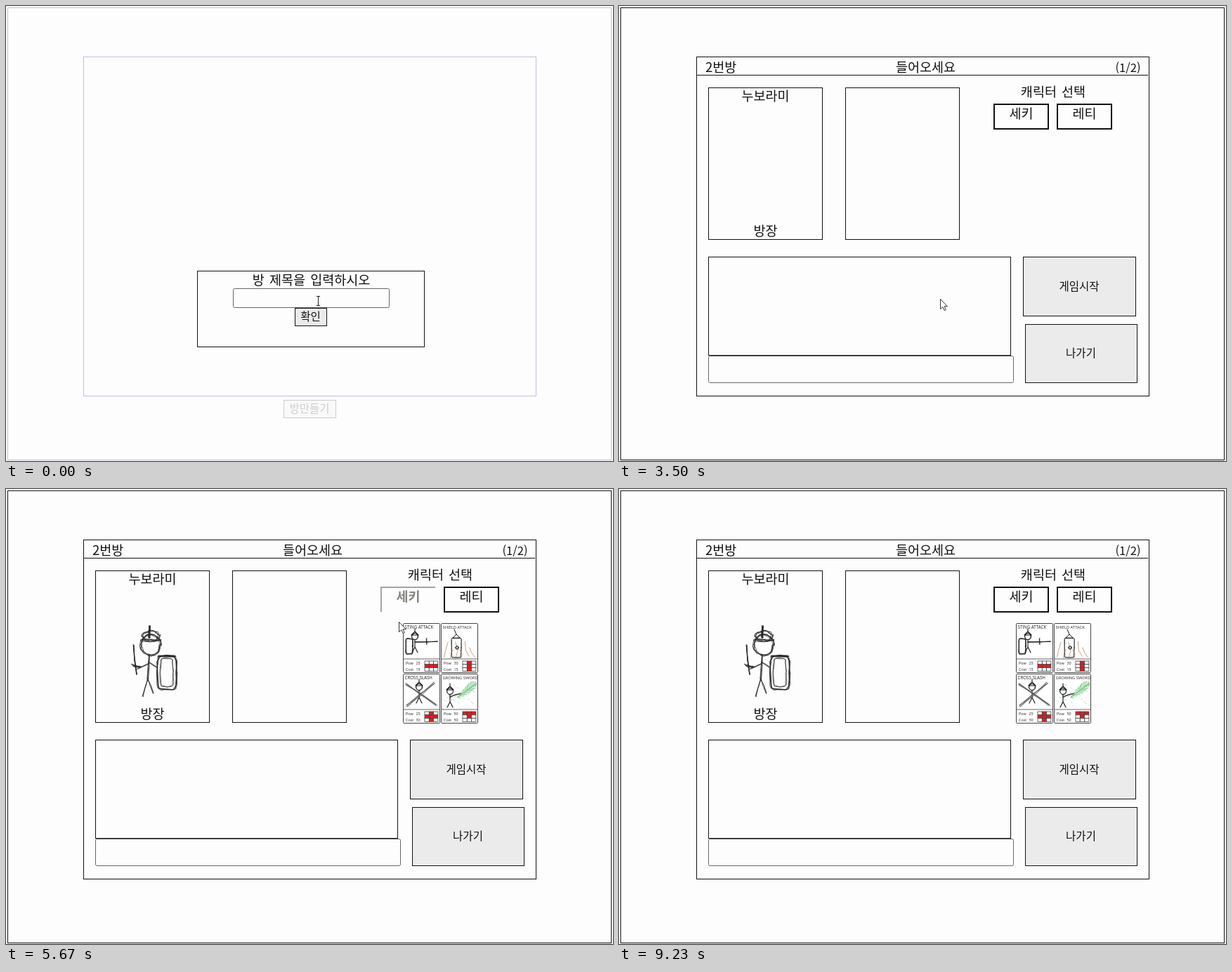
An HTML page that plays this animation: 864 by 648 pixels, repeating every 9.31 s.

```html
<!DOCTYPE html>
<html lang="ko">
<head>
<meta charset="utf-8">
<title>방 만들기</title>
<style>
  html, body { margin: 0; width: 100%; height: 100%; overflow: hidden; background: #fdfdfd; }
  svg { display: block; width: 864px; height: 648px; }
  text { font-family: "Noto Sans CJK KR", "Noto Sans CJK", sans-serif; fill: #111; white-space: pre; }
  .card text { font-family: "Open Sans", sans-serif; fill: #222; }
  .line { fill: none; stroke: #111; }
  .sketch { fill: none; stroke-linecap: round; stroke-linejoin: round; }
  #lobby > .line.faded { stroke: #c4c0d8; }
  .button .line { fill: #ebebec; }
  .field .line { fill: #fdfdfd; stroke: #666; }
  .field .focus { stroke: #111; stroke-width: 2; }
</style>
</head>
<body>
<svg viewBox="0 0 864 648">
  <g id="lobby"></g>
  <g id="room"></g>
  <path id="arrow" d="M.5 .5v14.2l3.3-3.1 2.4 5 2.1-1-2.3-4.8h4.4z" fill="#fff" stroke="#333"/>
  <path id="beam" d="M-2 -6.5h5M.5 -6v12M-2 6.5h5" fill="none" stroke="#222"/>
</svg>
<script>
const LOOP = 9310, BIG = 18.5, SMALL = 15.5;
const $ = id => document.getElementById(id);

let seed = 7;
const rand = () => (seed = seed * 16807 % 2147483647) / 2147483647;
const jitter = amount => (rand() - .5) * 2 * amount;
const times = (n, make) => Array.from({ length: n }, (_, i) => make(i));

// Boxes are given by the pixels of their outer lines
const box = (x, y, w, h, attrs = 'class="line"') =>
  `<rect x="${x + .5}" y="${y + .5}" width="${w}" height="${h}" ${attrs}/>`;
const label = (x, cy, size, str, attrs = 'text-anchor="middle"') =>
  `<text x="${x}" y="${cy + size * .37}" font-size="${size}" word-spacing="2" ${attrs}>${str}</text>`;
const button = (x, y, w, h, str, attrs = '') =>
  `<g class="button" ${attrs}>${box(x, y, w, h)}${label(x + w / 2, y + h / 2, SMALL, str)}</g>`;
const field = (id, x, y, w, h) => `<g class="field">
  ${box(x, y, w, h, `class="line" id="${id}Box" rx="2"`)}
  <rect class="line focus" id="${id}Focus" x="${x + 1}" y="${y}" width="${w - 1}" height="${h - .5}" rx="2"/></g>`;
const caret = (id, y) => `<rect id="${id}" y="${y}" width="1" height="16" fill="#111"/>`;

const stroke = (d, color = '#222', width = .7) =>
  `<path class="sketch" d="${d}" stroke="${color}" stroke-width="${width}"/>`;

// Retraces a curve p(0..1) several times with a loose hand
const trace = (p, steps, passes, loose, color) => stroke(times(passes, () =>
  'M' + times(steps + 1, i => p(i / steps).map(v => (v + jitter(loose)).toFixed(1)).join(' ')).join('L')).join(''), color);
const limb = (x1, y1, x2, y2, passes = 3, loose = 1, color = '#222') =>
  trace(k => [x1 + (x2 - x1) * k, y1 + (y2 - y1) * k], 2, passes, loose, color);

// power 1 gives an ellipse, smaller powers a rounded box
function ring(cx, cy, rx, ry, passes, loose, power = 1) {
  const bend = v => Math.sign(v) * Math.abs(v) ** power;
  return trace(k => [cx + rx * bend(Math.cos(k * 2 * Math.PI)), cy + ry * bend(Math.sin(k * 2 * Math.PI))],
    16, passes, loose);
}

const knight = () =>
  ring(206, 222, 14, 15, 5, 1.8) + ring(206, 209, 12, 7, 4, 2) + limb(204, 196, 204, 212, 9, 1.6)
  + limb(193, 216, 219, 216, 4, 2) + limb(204, 237, 202, 270, 4, 1.2)
  + limb(202, 270, 195, 296) + limb(202, 270, 209, 291)
  + limb(203, 248, 187, 256) + limb(203, 247, 215, 254)
  + limb(181, 222, 186, 264, 5, 1.3) + limb(180, 251, 191, 254, 6, 2)
  + ring(229, 262, 13.5, 24, 5, 1.4, .35) + ring(229, 261, 9, 20, 2, 1.2, .35) + limb(217, 238, 241, 238, 5, 1.5);

const smallMan = (x, y) => ring(x, y, 4.5, 4.5, 3, .5)
  + stroke(`M${x - 5} ${y - 2}l5-5 5 5zm5-5v-4M${x} ${y + 5}v10l-4 8m4-8 4 8`, '#111', 1.1);

function fern() {
  const leaflets = times(10, i => {
    const k = i / 9, len = 3 + 7 * Math.sin(k * 3);
    return `M${24 + 24 * k} ${34 - 19 * k}l${len * .3 + jitter(1)} ${-len}m${-len * .3} ${len}l${len} ${-len * .1 + jitter(1)}`;
  }).join('');
  const specks = times(18, () => `M${5 + rand() * 42} ${15 + rand() * 30}l1 1`).join('');
  return stroke('M24 34L50 14' + leaflets, '#3caf50') + stroke(specks, '#6cc47a');
}

const cards = [
  { title: 'STING ATTACK', pow: 25, cost: 15, hit: (c, r) => r === 1,
    draw: () => smallMan(17, 19) + ring(9, 33, 5, 11, 4, .7, .35) + limb(17, 27, 49, 26, 4, .5) + limb(34, 22, 34, 30) },
  { title: 'SHIELD ATTACK', pow: 30, cost: 15, hit: c => c === 1,
    draw: () => ring(22, 35, 7, 14, 2, .5, .2) + ring(23, 35, 2, 2, 3, .5)
      + stroke('M17 21l5-5 5 5zm5-5l-3-7', '#111', 1)
      + times(6, i => limb(4 + i * 9, 49, 10 + i * 6, 28 + 8 * (i % 2), 1, 2, '#a97a50')).join('') },
  { title: 'CROSS SLASH', pow: 25, cost: 30, hit: (c, r) => c === 1 || r === 1,
    draw: () => smallMan(23, 19) + limb(5, 15, 48, 45, 6, 1.6, '#555') + limb(45, 13, 6, 46, 6, 1.6, '#555') },
  { title: 'GROWING SWORD', pow: 50, cost: 50, hit: (c, r) => r === 0 || r === 1 && c === 1,
    draw: () => fern() + smallMan(13, 25) + limb(13, 33, 28, 28) }
];

function card({ title, pow, cost, hit, draw }, index) {
  const note = (x, y, str, size = 5.4) => `<text x="${x}" y="${y}" font-size="${size}">${str}</text>`;
  const cells = times(9, i => {
    const c = i % 3, r = Math.floor(i / 3);
    return `<rect x="${31 + c * 6.3}" y="${54 + r * 4.8}" width="6.3" height="4.8"
      fill="${hit(c, r) ? '#e8191c' : '#fff'}" stroke="#444" stroke-width=".8"/>`;
  }).join('');
  return `<g class="card" transform="translate(${565 + index % 2 * 54} ${191 + Math.floor(index / 2) * 72})">
    ${box(0, 0, 52, 70, 'rx="1" fill="#fff" stroke="#444"')}${draw()}<path d="M1 51h51" stroke="#666"/>
    ${note(2.5, 7.5, title, title.length > 12 ? 5.8 : 6.2)}
    ${note(4, 59, 'Pow')}${note(18.5, 59, pow)}${note(4, 68, 'Cost')}${note(18.5, 68, cost)}${cells}</g>`;
}

const choice = (x, str) => `<rect class="line" x="${x}" y="140" width="77" height="35" stroke-width="2"/>`
  + label(x + 38.5, 153.5, BIG, str);

$('lobby').innerHTML =
  box(2, 2, 859, 644, 'class="line faded"') + box(110, 72, 644, 483, 'class="line faded"')
  + button(395, 561, 74, 25, '방만들기', 'opacity=".2"')
  + box(272, 377, 323, 108)
  + label(434.5, 390, BIG, '방 제목을 입력하시오')
  + field('title', 323, 402, 222, 27)
  + '<rect id="mark" y="408" width="14.3" height="16.5" fill="#3390f6"/>'
  + label(328, 415.5, SMALL, '', 'id="typed"') + caret('titleCaret', 408)
  + button(411, 429, 45, 25, '확인', 'id="confirm"');

$('room').innerHTML =
  box(2, 2, 859, 644) + box(110, 72, 644, 483) + '<path class="line" d="M110 98.5h643"/>'
  + label(123, 87, BIG, '2번방', '') + label(436.5, 87, BIG, '들어오세요')
  + label(742.5, 88, 16.5, '(1/2)', 'text-anchor="end"')
  + box(127, 116, 162, 216) + box(322, 116, 162, 216)
  + label(208.5, 128.5, BIG, '누보라미') + label(208.5, 320.5, BIG, '방장')
  + label(618, 122.5, BIG, '캐릭터 선택')
  + `<g id="pickIdle">${choice(534, '세키')}</g>`
  + `<g id="pickOn"><path d="M534 175v-35h77" fill="none" stroke="#a4a4a4" stroke-width="2"/>
     ${label(572.5, 153.5, BIG, '세키', 'text-anchor="middle" font-weight="700" style="fill:#85857d"')}</g>`
  + choice(624, '레티')
  + box(127, 357, 430, 140) + field('chat', 127, 498, 434, 38) + caret('chatCaret', 509)
  + button(575, 357, 160, 84, '게임시작') + button(578, 453, 159, 83, '나가기')
  + `<g id="chosen">${knight()}${cards.map(card).join('')}</g>`;
$('chatCaret').setAttribute('x', 131);

const LEADS = 'ㄱㄲㄴㄷㄸㄹㅁㅂㅃㅅㅆㅇㅈㅉㅊㅋㅌㅍㅎ';
const TAILS = ' ㄱㄲㄳㄴㄵㄶㄷㄹㄺㄻㄼㄽㄾㄿㅀㅁㅂㅄㅅㅆㅇㅈㅊㅋㅌㅍㅎ';

// What a Korean input method shows after each keystroke
function keystrokes(word) {
  const shown = [''];
  let done = '';
  for (const syllable of word) {
    const code = syllable.charCodeAt(0) - 0xAC00, tail = code % 28;
    const lead = LEADS[Math.floor(code / 588)];
    const last = done.charCodeAt(done.length - 1) - 0xAC00;
    // a new consonant first hangs under an open syllable
    shown.push(last % 28 === 0
      ? done.slice(0, -1) + String.fromCharCode(0xAC00 + last + TAILS.indexOf(lead))
      : done + lead);
    shown.push(done + String.fromCharCode(0xAC00 + code - tail));
    done += syllable;
    if (tail) shown.push(done);
  }
  return shown;
}
const typing = keystrokes('들어오세요');
const keyTime = i => i ? 930 + 100 * i + 100 * Math.max(0, i - 3) : 0;

const moves = [
  { from: 130, to: 530, x: 457, y: 417 },
  { from: 4300, to: 5130, x: 567, y: 162 },
  { from: 5330, to: 5670, x: 559, y: 188 },
  { from: 5670, to: 6030, x: 615, y: 362 },
  { from: 6170, to: 6500, x: 497, y: 383 },
  { from: 6700, to: 7200, x: 477, y: 513 },
  { from: 8100, to: 8230, x: 497, y: 447 },
  { from: 8570, to: 8830, x: 868, y: 382 }
];
const easeOut = k => 1 - (1 - k) ** 2.4;

function pointerAt(t) {
  let x = 444, y = 420;
  for (const m of moves) {
    const k = easeOut(Math.min(1, Math.max(0, (t - m.from) / (m.to - m.from))));
    x += (m.x - x) * k;
    y += (m.y - y) * k;
  }
  return [Math.round(x), Math.round(y)];
}

const show = (id, on) => $(id).style.display = on ? '' : 'none';
const place = (id, x, y) => $(id).setAttribute('transform', `translate(${x} ${y})`);
const between = (t, a, b) => t >= a && t < b;
const blink = (t, start) => (t - start) % 1000 < 500;

function draw(t) {
  const inRoom = t >= 3430;
  show('lobby', !inRoom);
  show('room', inRoom);

  const naming = t >= 670;
  show('titleBox', !naming);
  show('titleFocus', naming);
  place('confirm', 0, naming ? 0 : 1);

  const text = typing.filter((_, i) => keyTime(i) <= t).pop();
  const advance = SMALL * .92, end = 328 + advance * text.length;
  $('typed').textContent = text;
  show('mark', text && t < 3370);
  $('mark').setAttribute('x', end - advance);
  $('titleCaret').setAttribute('x', Math.round(end) - (text ? 1 : 0));
  show('titleCaret', naming && (text || blink(t, 670)));

  const picked = between(t, 5330, 7630), chatting = between(t, 7630, 9200);
  show('pickIdle', !picked);
  show('pickOn', picked);
  show('chosen', t >= 5400);
  show('chatBox', !chatting);
  show('chatFocus', chatting);
  show('chatCaret', chatting && blink(t, 7630));

  const [x, y] = pointerAt(t);
  const overText = !inRoom || (y >= 498 && x < 562);
  show('beam', overText);
  show('arrow', !overText);
  place('beam', x, y);
  place('arrow', x, y);
}

const start = performance.now();
function tick() {
  draw((performance.now() - start) % LOOP);
  requestAnimationFrame(tick);
}
tick();
</script>
</body>
</html>
```
